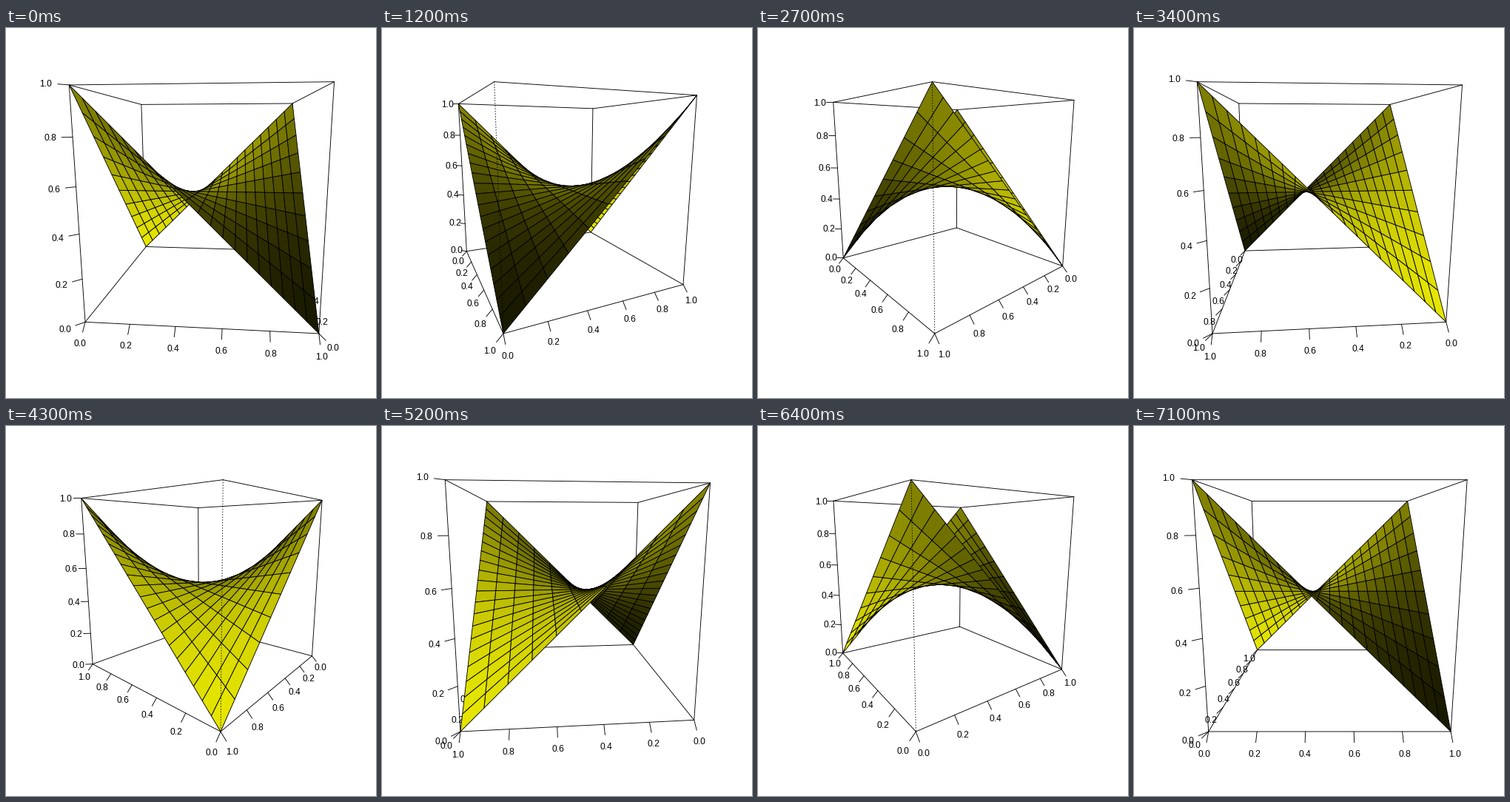
Recreate the animation shown at these times as a matplotlib script. Size 500x500 px, loop 7.2 s.

```python
import itertools

import matplotlib.pyplot as plt
import numpy as np
from matplotlib.animation import FuncAnimation
from matplotlib.collections import LineCollection, PolyCollection

SIZE, DPI, STEPS, INTERVAL = 500, 100, 72, 100
PX = 72 / DPI                      # points per pixel
LINE = 14.4                        # height of one margin line in pixels
LEFT, RIGHT = 4.1 * LINE, SIZE - 2.1 * LINE
TOP, BOTTOM = 4.1 * LINE, SIZE - 5.1 * LINE
PAD = 1.08                         # 4 % free on each side of the plot region
PHI, DIST = 10, np.sqrt(3)
TICK = 0.03
STROKE = 0.9 * PX
TICKS = np.arange(6) / 5


# Homogeneous row-vector transforms

def mul(a, b):
    return (a[:, :, None] * b[None]).sum(axis=1)


def translate(x, y, z):
    m = np.eye(4)
    m[3, :3] = x, y, z
    return m


def rot_x(deg):
    c, s = np.cos(np.radians(deg)), np.sin(np.radians(deg))
    m = np.eye(4)
    m[1, 1], m[1, 2], m[2, 1], m[2, 2] = c, s, -s, c
    return m


def rot_y(deg):
    c, s = np.cos(np.radians(deg)), np.sin(np.radians(deg))
    m = np.eye(4)
    m[0, 0], m[0, 2], m[2, 0], m[2, 2] = c, -s, s, c
    return m


def view(theta):
    perspective = np.eye(4)
    perspective[2, 3] = -1
    m = translate(-0.5, -0.5, -0.5)
    for step in (np.diag([2.0, 2, 2, 1]), rot_x(-90), rot_y(-theta),
                 rot_x(PHI), translate(0, 0, -DIST - 1), perspective):
        m = mul(m, step)
    return m


def project(m, pts):
    """Return flat positions and depths of the points."""
    pts = np.asarray(pts, float)
    v = mul(np.column_stack([pts, np.ones(len(pts))]), m)
    return v[:, :2] / v[:, 3:], v[:, 3]


# Saddle surface: 20 x 10 facets lit from one side

gx, gy = np.meshgrid(np.linspace(0, 1, 21), np.linspace(0, 1, 11), indexing="ij")
gz = gx * gy + (1 - gx) * (1 - gy)
GRID = np.stack([gx, gy, gz], axis=-1)


def facets(a):
    """Corner values of each facet, going round it."""
    quads = np.stack([a[:-1, :-1], a[1:, :-1], a[1:, 1:], a[:-1, 1:]], axis=2)
    return quads.reshape(-1, *quads.shape[2:])


QUADS = facets(GRID)
FLOOR = QUADS * [1, 1, 0]
normal = np.cross(QUADS[:, 1] - QUADS[:, 3], QUADS[:, 2] - QUADS[:, 0])
normal /= np.linalg.norm(normal, axis=1, keepdims=True)
shade = 0.5 * (1 + normal @ (np.array([-1, 1, 0]) / np.sqrt(2)))
COLORS = np.column_stack([shade, shade, 0 * shade, np.ones_like(shade)])

# Bounding box

CORNERS = np.array(list(itertools.product((0, 1), repeat=3)))
FLAT_EDGES = [(a, b) for a, b in itertools.combinations(range(8), 2)
              if abs(CORNERS[a] - CORNERS[b]).sum() == 1
              and CORNERS[a][2] == CORNERS[b][2]]
BASE = np.array([(0, 0, 0), (1, 0, 0), (0, 1, 0), (1, 1, 0)])


def axis_ticks(m):
    """Start, end and label point of every tick on the three axes."""
    base, _ = project(m, BASE)
    bx, by, _ = BASE[np.argmin(base[:, 1])]
    zx, zy, _ = BASE[np.argmin(base[:, 0])]
    starts, dirs = [], []
    for t in TICKS:
        starts += [(t, by, 0), (bx, t, 0), (zx, zy, t)]
        dirs += [(0, 2 * by - 1, -1), (2 * bx - 1, 0, -1),
                 (2 * zx - 1, 2 * zy - 1, 0)]
    starts, dirs = np.array(starts, float), np.array(dirs)
    return [starts + k * TICK * dirs for k in range(3)]


fig = plt.figure(figsize=(SIZE / DPI, SIZE / DPI), dpi=DPI, facecolor="white")
ax = fig.add_axes([0, 0, 1, 1])
ax.set(xlim=(0, SIZE), ylim=(SIZE, 0))
ax.axis("off")


def add_lines(zorder, style="solid"):
    lines = LineCollection([], colors="black", linewidths=STROKE,
                           linestyles=[style], capstyle="round", zorder=zorder)
    lines.set_snap(False)
    return ax.add_collection(lines, autolim=False)


frame_lines = add_lines(1)
labels = [ax.text(0, 0, f"{t:.1f}", family="Liberation Sans", size=12 * PX,
                  ha="center", va="baseline", zorder=2)
          for t in TICKS for _ in range(3)]
surface = PolyCollection([], edgecolors="black", linewidths=STROKE,
                         joinstyle="round", zorder=3)
surface.set_snap(False)
ax.add_collection(surface, autolim=False)
near_lines = add_lines(4, (0, (1, 3)))


def draw(i):
    theta = 5 * (i + 1)
    m = view(theta)

    # Fit the box into the plot region
    box, _ = project(m, CORNERS)
    lo, hi = box.min(axis=0), box.max(axis=0)
    scale = min((RIGHT - LEFT) / (hi - lo)[0], (BOTTOM - TOP) / (hi - lo)[1]) / PAD
    centre = np.array([LEFT + RIGHT, TOP + BOTTOM]) / 2

    def to_px(uv):
        return centre + (uv - (lo + hi) / 2) * scale * [1, -1]

    box = to_px(box)

    # An upright between two faces turned to the eye is dotted
    reach = (DIST + 2) * np.cos(np.radians(PHI))
    eye = reach * np.array([np.sin(np.radians(theta)), -np.cos(np.radians(theta))])
    solid = [box[[a, b]] for a, b in FLAT_EDGES]
    dotted = []
    for c in range(0, 8, 2):
        near = np.all((2 * CORNERS[c][:2] - 1) * eye > 1)
        (dotted if near else solid).append(box[[c + 1, c]])

    start, end, text = (to_px(project(m, p)[0]) for p in axis_ticks(m))
    frame_lines.set_segments(solid + list(np.stack([start, end], axis=1)))
    near_lines.set_segments(dotted)
    for label, (x, y) in zip(labels, text):
        label.set_position((x, y + 4.3))

    # Paint the facets from far to near
    depth = project(m, FLOOR.reshape(-1, 3))[1].reshape(-1, 4).max(axis=1)
    order = np.argsort(-depth, kind="stable")
    quads = to_px(project(m, QUADS.reshape(-1, 3))[0]).reshape(-1, 4, 2)
    surface.set_verts(quads[order])
    surface.set_facecolor(COLORS[order])
    return [frame_lines, *labels, surface, near_lines]


anim = FuncAnimation(fig, draw, frames=STEPS, interval=INTERVAL,
                     repeat=True, repeat_delay=0, blit=False)
plt.show()
```
